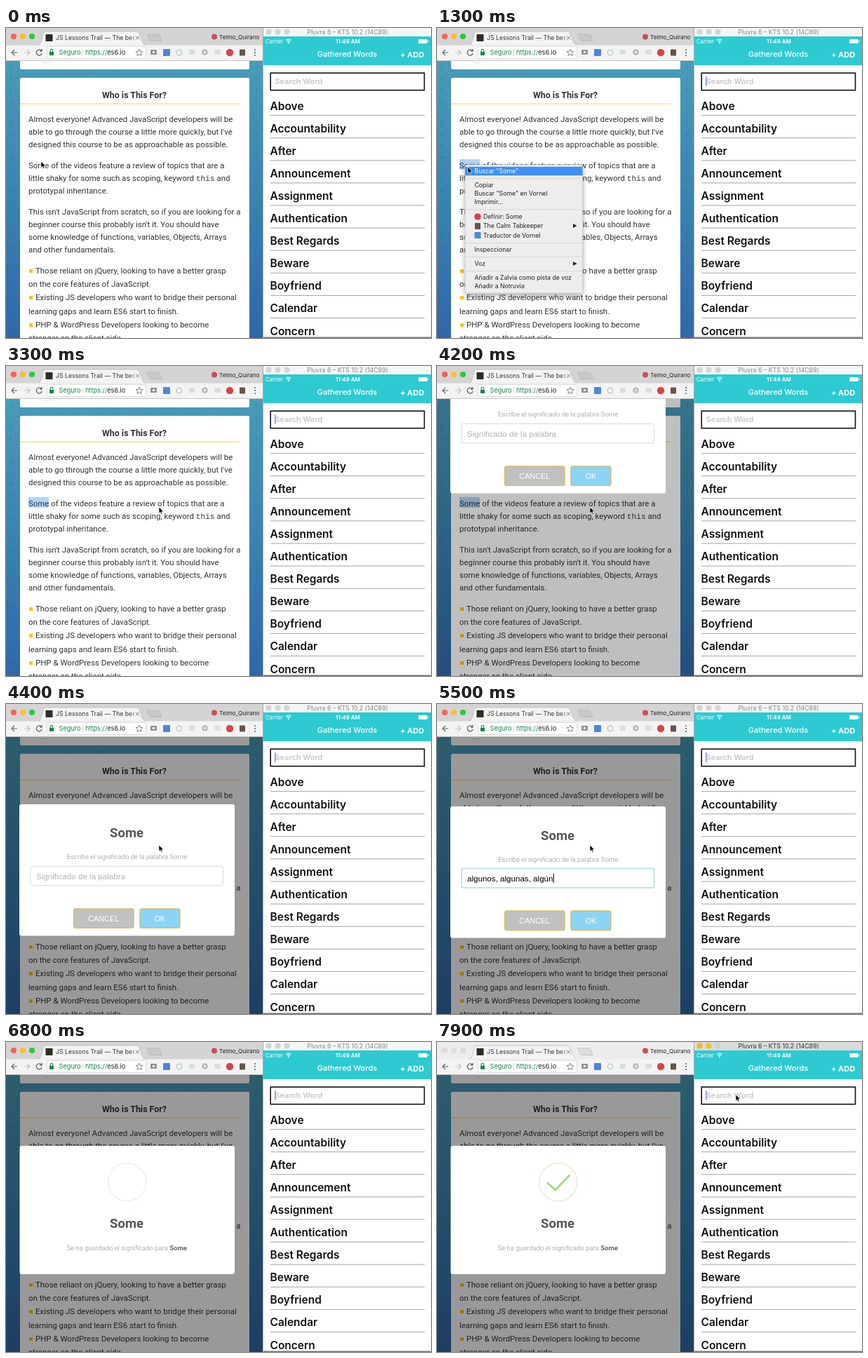
Recreate the animation shown at these times as an HTML page. Size 606x442 px, loop 8 s.

```html
<!DOCTYPE html>
<html lang="es">
<head>
<meta charset="utf-8">
<title>Word lookup</title>
<style>
html, body { margin: 0; width: 100%; height: 100%; overflow: hidden; background: #fff; }
svg { display: block; width: 606px; height: 442px; }
text { white-space: pre; }
.ui { font-family: Inter, "Open Sans", sans-serif; }
.page { font-family: Roboto, "Open Sans", sans-serif; }
.form { font-family: "Liberation Sans", Arial, sans-serif; }
.mono { font-family: "Liberation Mono", monospace; }
</style>
</head>
<body>
<svg id="stage" viewBox="0 0 606 442" xmlns="http://www.w3.org/2000/svg"></svg>
<script>
const LOOP = 8000;
const stage = document.getElementById('stage');

const rect = (x, y, w, h, fill, more = '') =>
  `<rect x="${x}" y="${y}" width="${w}" height="${h}" fill="${fill}" ${more}/>`;
const dot = (x, y, r, fill, more = '') =>
  `<circle cx="${x}" cy="${y}" r="${r}" fill="${fill}" ${more}/>`;
const line = (d, stroke, width = 1, more = '') =>
  `<path d="${d}" fill="none" stroke="${stroke}" stroke-width="${width}" ${more}/>`;
const label = (x, y, size, fill, str, cls = 'ui', more = '') =>
  `<text x="${x}" y="${y}" font-size="${size}" fill="${fill}" class="${cls}" ${more}>${str}</text>`;
const middle = 'text-anchor="middle"';

const defs = `<defs>
  <linearGradient id="sky" x1="0" y1="0" x2="0" y2="1">
    <stop offset="0" stop-color="#4a9dba"/><stop offset=".5" stop-color="#3b84b2"/><stop offset="1" stop-color="#3168a9"/>
  </linearGradient>
  <linearGradient id="tabFade"><stop offset=".8" stop-color="#333"/><stop offset="1" stop-color="#333" stop-opacity="0"/></linearGradient>
  <pattern id="mesh" width="14" height="16" patternUnits="userSpaceOnUse">
    <path d="M0 0L7 8L14 0M0 16L7 8L14 16M0 8H14M7 0V16" fill="none" stroke="#134a77" stroke-opacity=".16" stroke-width=".7"/>
  </pattern>
  <clipPath id="view"><path d="M0 47H366V442H0Z"/></clipPath>
  <clipPath id="phoneView"><path d="M367 0H606V442H367Z"/></clipPath>
  <clipPath id="tabText"><path d="M70 5H183V24H70Z"/></clipPath>
  <filter id="shadow" x="-20%" y="-20%" width="140%" height="140%">
    <feDropShadow dx="0" dy="3" stdDeviation="3.5" flood-opacity=".35"/>
  </filter>
</defs>`;

function article() {
  const lines = [
    [32, 134, 'Almost everyone! Advanced JavaScript developers will be'],
    [32, 152, 'able to go through the course a little more quickly, but I\'ve'],
    [32, 170, 'designed this course to be as approachable as possible.'],
    [32, 199.5, 'Some of the videos feature a review of topics that are a'],
    [32, 217.7, 'little shaky for some such as scoping, keyword <tspan class="mono" font-size="11.2">this</tspan> and'],
    [32, 236, 'prototypal inheritance.'],
    [32, 265.7, 'This isn\'t JavaScript from scratch, so if you are looking for a'],
    [32, 283.8, 'beginner course this probably isn\'t it. You should have'],
    [32, 302, 'some knowledge of functions, variables, Objects, Arrays'],
    [32, 320, 'and other fundamentals.'],
    [42, 350, 'Those reliant on jQuery, looking to have a better grasp'],
    [32, 369, 'on the core features of JavaScript.'],
    [42, 388, 'Existing JS developers who want to bridge their personal'],
    [32, 407.5, 'learning gaps and learn ES6 start to finish.'],
    [42, 427, 'PHP &amp; WordPress Developers looking to become'],
    [32, 445.5, 'stronger on the client side.']
  ];
  return rect(0, 47, 366, 395, 'url(#sky)') + rect(0, 47, 366, 395, 'url(#mesh)') +
    rect(20, 40, 327, 19, '#fff', 'rx="2"') +
    line('M51 46a6 4 0 0 0 12 0', '#ddd') +
    rect(20, 71, 327, 380, '#fff', 'rx="2"') +
    label(183, 99.5, 12.4, '#333', 'Who is This For?', 'page', middle + ' font-weight="700"') +
    rect(20, 107.5, 313, 1.3, '#ffdf6b') +
    rect(32, 187, 29, 15, '#b0d5fb', 'id="selection"') +
    lines.map(([x, y, str]) =>
      (x > 32 ? rect(33, y - 6, 5, 5, '#ffc600') : '') + label(x, y, 11.45, '#333', str, 'page')).join('');
}

function prompt() {
  const button = (x, w, fill, str) =>
    rect(x, 295, w, 27.5, fill, 'rx="3" stroke="#d6bd62" stroke-width="1.4"') +
    label(x + w / 2, 313, 10.9, '#fff', str, 'form', middle);
  return '<g id="prompt">' + rect(19, 146, 307, 187.5, '#fff', 'rx="3"') +
    label(172, 193.5, 18.5, '#575757', 'Some', 'page', middle + ' font-weight="700"') +
    label(172.5, 224.5, 9.6, '#8a8a8a', 'Escribe el significado de la palabra Some', 'page', middle + ' font-weight="300"') +
    rect(35, 234.5, 274.5, 27.5, '#fff', 'id="field" rx="2" stroke="#d7d7d7"') +
    label(43, 252.7, 11.6, '#000', '', 'form', 'id="typed"') +
    rect(0, 242, 1, 13, '#000', 'id="caret"') +
    button(96.5, 85.5, '#c1c1c1', 'CANCEL') + button(191, 57, '#8cd4f5', 'OK') + '</g>';
}

function success() {
  return '<g id="success">' + rect(19.5, 148, 306.5, 183, '#fff', 'rx="3"') +
    dot(172.7, 199.7, 27, 'none', 'id="ring" stroke="#e4f4da" stroke-width="2"') +
    line('M158 201L168.5 211L188.5 190.5', '#a5dc86', 3, 'id="check" pathLength="1" stroke-dasharray="1 2" stroke-linecap="round"') +
    label(172, 264.5, 18.5, '#575757', 'Some', 'page', middle + ' font-weight="700"') +
    label(172.3, 296.5, 9.6, '#8a8a8a', 'Se ha guardado el significado para <tspan font-weight="700" fill="#666">Some</tspan>',
      'page', middle + ' font-weight="300"') + '</g>';
}

function toolbar() {
  const grey = '#777';
  const extensions = [
    rect(206, 31, 9, 7, '#8a9489', 'rx="1"') + dot(210.5, 34.5, 1.8, '#eee'),
    rect(224, 30, 10, 10, '#4b87d9', 'rx="1"'),
    dot(247, 35, 3.8, 'none', 'stroke="#bccdd0" stroke-width="1.5"'),
    rect(261, 31, 8, 7, '#dcdcdc', 'rx="1"'),
    dot(283.5, 34.5, 4.3, '#b9b9b9') + dot(283.5, 34.5, 1.7, '#eee'),
    rect(297, 31, 9, 7, '#dedede', 'rx="1"'),
    dot(319, 35, 5.2, '#d8434b'),
    rect(333, 30.5, 8, 9, '#655449', 'rx="1"'),
    [31, 35, 39].map(y => dot(355, y, 1.1, '#666')).join('')
  ].join('');
  return rect(0, 0, 366, 25, '#d4d4d4', 'id="strip"') +
    [11, 24, 37].map(x => dot(x, 12, 4.1, '#ddd', 'class="light"')).join('') +
    '<path d="M46 25Q49 24 51 17L53 8Q54 5 57 5H186Q189 5 190 8L194 19Q196 24 200 25Z" fill="#f3f3f3" stroke="#b5b5b5" stroke-width=".7"/>' +
    rect(56.5, 9, 10, 10, '#2d2c22') +
    `<g clip-path="url(#tabText)">${label(71, 17.3, 8.7, 'url(#tabFade)', 'JS Lessons Trail — The best es')}</g>` +
    line('M185 11.5l5 5m0-5l-5 5', grey) +
    '<path d="M201 9H216Q218 9 219 11L222 18.5H207Q205 18.5 204 16.5Z" fill="#c9c9c9" stroke="#aaa" stroke-width=".6" id="newTab"/>' +
    dot(297, 12.5, 4, '#c8505a') +
    label(304, 15.5, 8.2, '#222', 'Telmo_Quirano') +
    rect(0, 24.5, 366, 22.5, '#f3f3f3') + rect(0, 46, 366, 1, '#c4c4c4') +
    line('M16 35H8m4-4l-4 4l4 4', '#666', 1.2) + line('M26 35h8m-4-4l4 4l-4 4', '#c2c2c2', 1.2) +
    line('M50.5 32.5a4 4 0 1 0 .7 3.5M51 30v3h-3', '#666', 1.3) +
    rect(58.5, 26.5, 141, 17, '#fff', 'rx="2" stroke="#d0d0d0" stroke-width=".7"') +
    rect(62, 34, 6, 5, '#16864b') + line('M63.2 34v-2a1.8 1.8 0 0 1 3.6 0v2', '#16864b', 1.1) +
    label(75.5, 38.2, 9.2, '#16864b', 'Seguro') + rect(109, 30, 0.8, 10, '#ccc') +
    label(113, 38.2, 9.2, '#16864b', 'https://<tspan fill="#222">es6.io</tspan>') +
    '<path d="M190 30l1.4 3.3l3.6.3l-2.7 2.4l.8 3.5l-3.1-1.9l-3.1 1.9l.8-3.5l-2.7-2.4l3.6-.3z" fill="none" stroke="#777" stroke-width=".9"/>' +
    extensions;
}

const menuItems = [
  [204, 'Buscar "Some"'], [224, 'Copiar'], [236, 'Buscar "Some" en Vornel'], [248, 'Imprimir...'],
  [269, 'Definir: Some', dot(58, 269, 4.8, '#d8434b')],
  [282, 'The Calm Tabkeeper', rect(54, 278, 8, 9, '#655449', 'rx="1"'), true],
  [296, 'Traductor de Vornel', rect(53.5, 291, 9, 9, '#4b87d9', 'rx="1"')],
  [316, 'Inspeccionar'], [336, 'Voz', '', true],
  [356, 'Añadir a Zalvia como pista de voz'], [368, 'Añadir a Notruvia']
];

function menu() {
  const rows = menuItems.map(([y, str, icon = '', arrow]) =>
    `<g class="item">${label(icon ? 66 : 53.5, y + 3, 8.7, 'currentColor', str)}${icon}` +
    (arrow ? `<path d="M194 ${y - 3}l5.5 3l-5.5 3z" fill="currentColor"/>` : '') + '</g>').join('');
  return '<g id="menu">' + rect(40, 195, 167.5, 183, '#ededed', 'rx="3" stroke="#bbb" stroke-width=".6" filter="url(#shadow)"') +
    [214, 258.5, 306, 326, 346].map(y => rect(40, y, 167.5, 1, '#d6d6d6')).join('') +
    rect(40, 0, 167.5, 12.5, '#3e90f6', 'id="hover"') + rows + '</g>';
}

function phone() {
  const words = ['Above', 'Accountability', 'After', 'Announcement', 'Assignment', 'Authentication',
    'Best Regards', 'Beware', 'Boyfriend', 'Calendar', 'Concern'];
  const rows = words.map((word, i) => {
    const y = 116.5 + i * 32.1;
    return label(376.5, y, 15.5, '#111', word, 'ui', 'font-weight="600"') + rect(377, y + 7.6, 220, 1, '#a3a3a3');
  }).join('');
  return '<g clip-path="url(#phoneView)">' + rect(366, 0, 240, 442, '#fff') +
    rect(367, 0, 239, 12, '#f5f5f5', 'id="phoneBar"') +
    [374.5, 387.5, 400.5].map(x => dot(x, 5.5, 4.1, '#d4d4d4', 'class="phoneLight"')).join('') +
    label(487, 9, 8.8, '#888', 'Pluvra 6 – KTS 10.2 (14C89)', 'ui', middle + ' id="phoneTitle"') +
    rect(367, 12, 239, 41, '#2dcad1') +
    label(370, 22, 7.7, '#fff', 'Carrier') +
    line('M399 17.6a5.6 5.6 0 0 1 7.6 0M400.7 19.5a3.2 3.2 0 0 1 4.2 0', '#fff', 1.1) + dot(402.8, 21.3, 1, '#fff') +
    label(487.5, 22, 8, '#fff', '11:49 AM', 'ui', middle + ' font-weight="600"') +
    rect(588, 16, 12.5, 6, '#fff', 'rx="1"') + rect(601.3, 18, 1.2, 2, '#fff') +
    label(486.5, 41.3, 11, '#fff', 'Gathered Words', 'ui', middle + ' font-weight="500"') +
    label(562, 42, 11, '#fff', '+ ADD', 'ui', 'font-weight="700"') +
    rect(377.2, 64.2, 219.3, 24.5, '#fff', 'stroke="#111" stroke-width="1.6"') +
    label(383.5, 80, 10.9, '#c5c5cb', 'Search Word', 'ui', 'font-weight="600"') +
    rect(383.2, 69, 1.3, 14, '#7182dc', 'id="searchCaret"') + rows +
    rect(367, 440.5, 239, 1.5, '#777') + '</g>' + rect(366, 0, 1, 442, '#aaa');
}

stage.innerHTML = defs +
  `<g clip-path="url(#view)">${article()}${rect(0, 47, 366, 395, '#000', 'id="shade"')}${prompt()}${success()}</g>` +
  toolbar() + phone() + menu() +
  '<path id="pointer" d="M0 0V9.2L2.1 7.3L3.5 10.4L5 9.7L3.7 6.7H6.6Z" fill="#000" stroke="#fff" stroke-width=".7"/>';

const el = Object.fromEntries([...stage.querySelectorAll('[id]')].map(node => [node.id, node]));
const items = [...stage.querySelectorAll('.item')];
const lights = [...stage.querySelectorAll('.light')];
const phoneLights = [...stage.querySelectorAll('.phoneLight')];

const progress = (t, from, to) => Math.min(1, Math.max(0, (t - from) / (to - from)));
const smooth = p => p * p * (3 - 2 * p);
const set = (node, attrs) => { for (const key in attrs) node.setAttribute(key, attrs[key]); };
const show = (node, on) => set(node, { visibility: on ? 'visible' : 'hidden' });

// CSS "ease": cubic-bezier(.25, .1, .25, 1), solved by bisection
function ease(p) {
  const curve = (a, b, s) => 3 * a * s * (1 - s) ** 2 + 3 * b * s * s * (1 - s) + s ** 3;
  let low = 0, high = 1;
  for (let i = 0; i < 20; i++) {
    const mid = (low + high) / 2;
    if (curve(.25, .25, mid) < p) low = mid; else high = mid;
  }
  return curve(.1, 1, low);
}

const route = [
  [0, 50, 190], [400, 50, 190], [800, 41, 195], [1200, 41, 195], [1900, 93, 250], [2100, 93, 250],
  [2500, 95, 268], [2850, 95, 268], [3250, 218, 201], [7200, 218, 201], [7650, 426, 75], [LOOP, 426, 75]
];

function pointerAt(t) {
  const i = route.findIndex(([time]) => time > t);
  const [t0, x0, y0] = route[i - 1], [t1, x1, y1] = route[i];
  const p = smooth(progress(t, t0, t1));
  return [x0 + (x1 - x0) * p, y0 + (y1 - y0) * p];
}

const answer = 'algunos, algunas, algún';

function drawMenu(t, y) {
  show(el.menu, t >= 950 && t < 3000);
  set(el.menu, { opacity: 1 - progress(t, 2820, 3000) });
  const active = menuItems.findIndex(([row]) => Math.abs(row - y) < 6.2);
  items.forEach((item, i) => { item.style.color = i === active ? '#fff' : '#222'; });
  set(el.hover, { y: active < 0 ? 0 : menuItems[active][0] - 6.2, opacity: active < 0 ? 0 : 1 });
}

function drawPrompt(t) {
  show(el.prompt, t >= 4150 && t < 6500);
  set(el.prompt, { transform: `translate(0 ${-197 * (1 - ease(progress(t, 4150, 4450)))})` });
  const count = Math.floor(progress(t, 4650, 5400) * answer.length);
  el.typed.textContent = count ? answer.slice(0, count) : 'Significado de la palabra';
  set(el.typed, { fill: count ? '#000' : '#b3b3b3' });
  const focused = t >= 4450;
  set(el.field, { stroke: focused ? '#b4dbed' : '#d7d7d7', 'stroke-width': focused ? 1.6 : 1 });
  set(el.caret, { x: 43.3 + (count ? el.typed.getComputedTextLength() : 0) });
  const caretOn = focused && t < 6500 && (t < 5600 || t % 1000 < 500);
  set(el.caret, { visibility: caretOn ? 'visible' : 'hidden' });
}

function drawSuccess(t) {
  show(el.success, t >= 6500);
  const drawn = smooth(progress(t, 6900, 7250));
  set(el.check, { 'stroke-dashoffset': 1 - drawn, visibility: drawn > 0 ? 'visible' : 'hidden' });
  set(el.ring, { stroke: drawn > 0 ? '#e4f4da' : '#eef5e9' });
}

function drawFocus(onPhone) {
  set(el.strip, { fill: onPhone ? '#ececec' : '#d4d4d4' });
  set(el.newTab, { fill: onPhone ? '#dedede' : '#c9c9c9' });
  const browserColors = ['#fb5f57', '#fbbd2e', '#2ac840'];
  lights.forEach((node, i) => set(node, { fill: onPhone ? '#dcdcdc' : browserColors[i] }));
  const phoneColors = ['#f7b32f', '#f9be2e', '#d0d0d0'];
  phoneLights.forEach((node, i) => set(node, { fill: onPhone ? phoneColors[i] : '#d4d4d4' }));
  set(el.phoneBar, { fill: onPhone ? '#dadada' : '#f5f5f5' });
  set(el.phoneTitle, { fill: onPhone ? '#333' : '#888' });
}

function draw(t) {
  const [x, y] = pointerAt(t);
  set(el.pointer, { transform: `translate(${x} ${y})` });
  show(el.pointer, t < 6500 || t >= 7200);
  show(el.selection, t >= 900);
  set(el.shade, { opacity: .4 * progress(t, 4100, 4260) });
  const blink = t % 1000;
  show(el.searchCaret, blink >= 250 && blink < 950);
  drawMenu(t, y);
  drawPrompt(t);
  drawSuccess(t);
  drawFocus(t >= 7700);
}

const start = performance.now();
function tick() {
  draw((performance.now() - start) % LOOP);
  requestAnimationFrame(tick);
}
tick();
</script>
</body>
</html>
```
